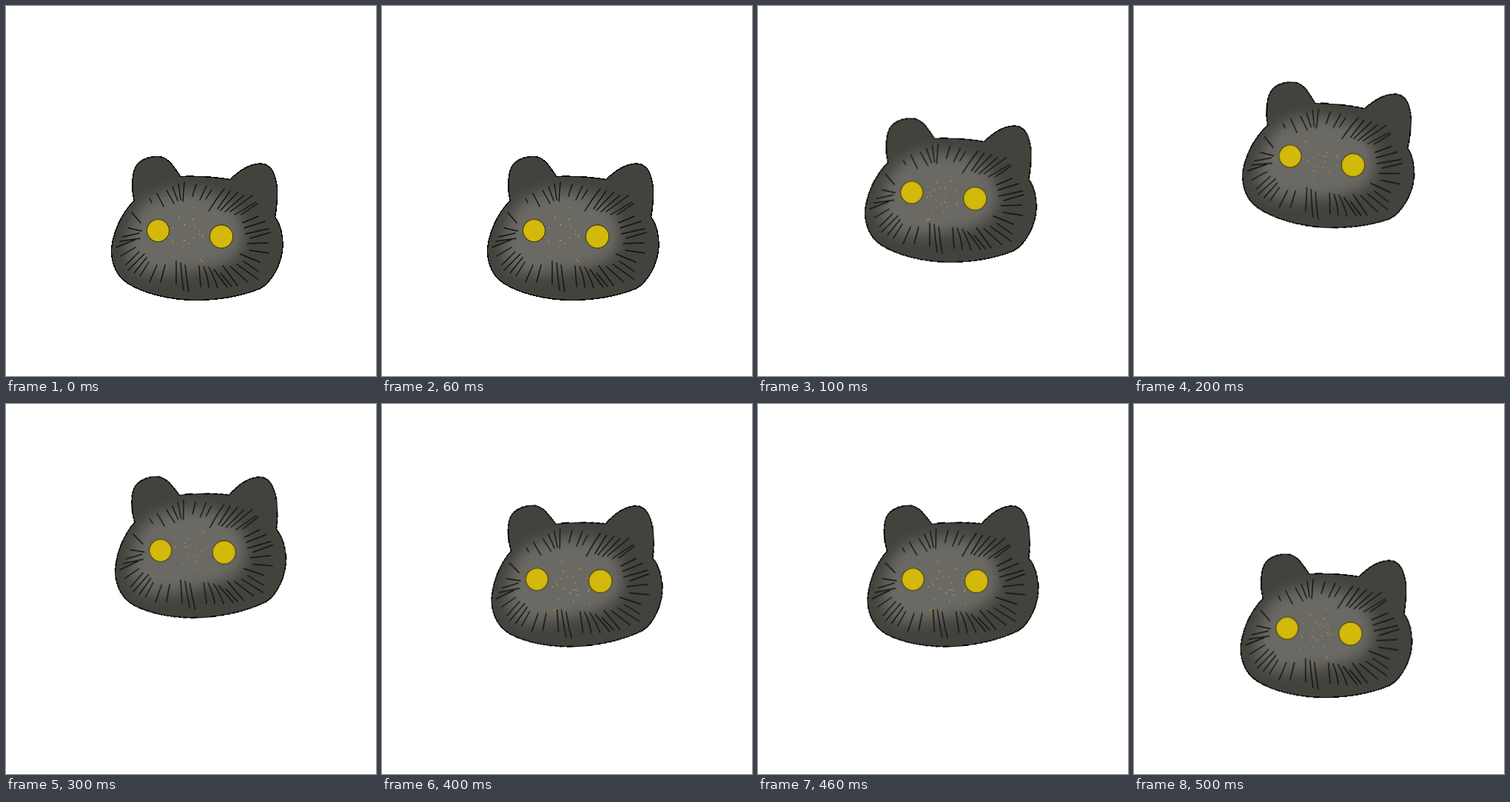
These frames come from a looping animation (500x500 px, 600 ms). An HTML page without scripts:

```html
<!DOCTYPE html>
<html lang="en">
<head>
<meta charset="utf-8">
<title>Bouncing cat head</title>
<style>
  html, body { margin: 0; width: 100%; height: 100%; overflow: hidden; background: #fff; }
  svg { display: block; width: 100%; height: 100%; }
  .head, .specks { animation: bounce .6s step-end infinite; }
  .head { transform-origin: 248.2px 307.5px; }
  .specks { animation-name: shuffle; transform-origin: 246px 308px; }
  .skin { fill: #43423d; }
  .rim { fill: none; stroke: #060605; stroke-width: 1.5; shape-rendering: crispEdges; }
  .fur { fill: none; stroke: #12110e; stroke-width: 1.4; stroke-linecap: round; }
  .eyes { fill: #d2b90b; stroke: #46400f; stroke-width: 1.1; }
  .gold, .pale { fill: none; stroke: #c8a804; stroke-width: 1.6; }
  .pale { stroke: #b3b09c; stroke-width: 1.2; }

  @keyframes bounce {
    0% { transform: none; }
    16.667% { transform: translate(2.3px, -51.4px) rotate(.2deg); }
    33.333% { transform: translate(5.3px, -98.5px) rotate(2.7deg); }
    50% { transform: translate(3.5px, -108.3px) rotate(-3.7deg); }
    66.667% { transform: translate(4px, -69.3px) rotate(-3.7deg); }
    83.333%, 100% { transform: translate(1.5px, -.8px) rotate(-.4deg); }
  }
  @keyframes shuffle {
    0% { transform: none; }
    16.667% { transform: scale(-1, .9); }
    33.333% { transform: rotate(180deg) scale(1.1, .7); }
    50% { transform: scale(1, -.7); }
    66.667% { transform: translate(4px, 5px) scale(-1.2, .9); }
    83.333%, 100% { transform: rotate(9deg) scale(.95, .9); }
  }
</style>
</head>
<body>
<svg viewBox="0 0 500 500">
  <defs>
    <path id="shape" d="M173 263C170 249 169.500 231 174.500 219C180 207 194 203 207 203.500C221 205 228 220 236 230.500
      Q270 229 303 234.500C315 223 328 213 345 213C360 214 365 230 366.500 247Q367 268 363.500 285
      C372 296 374 309 374 325C373 347 360 373 343 382C318 392 287 397.500 255 397.500
      C222 397 187 389 165 375C148 364 142 346 142.500 327C146 303 156 281 173 263Z"/>
    <clipPath id="inside"><use href="#shape"/></clipPath>
    <filter id="soft" x="-30%" y="-30%" width="160%" height="160%" color-interpolation-filters="sRGB">
      <feGaussianBlur stdDeviation="9"/>
    </filter>
  </defs>
  <g class="head">
    <use class="skin" href="#shape"/>
    <g clip-path="url(#inside)">
      <path d="M182 271C202 246 245 243 280 254C309 264 324 287 321 315C318 342 291 353 265 356
        C232 361 186 370 170 352C156 336 164 294 182 271Z" fill="#6a6963" filter="url(#soft)"/>
    </g>
    <use class="rim" href="#shape"/>
    <g class="fur">
      <path d="M194 260L197 266M204 253L213 271M217 249L227 267M225 244L232 263M233 240L236 262
        M241 238L239 264M257 241L252 257M271 243L262 262M278 248L270 261M295 247Q286 258 274 277M303 250L286 274
        M313 252L290 276M321 256L296 278M333 256L303 278M338 265L309 282M340 267L318 282"/>
      <path d="M170 279L182 293M165 300L183 304M158 312L180 307M154 318L181 314M149 326L174 316M155 338L175 326
        M162 350L180 332M165 357L187 335M173 361L190 340M181 365L193 346"/>
      <path d="M194 373L204 350M209 373L215 350M230 376L230 345M240 384Q237 365 236 347M247 386Q244 368 242 350
        M263 379L261 351M274 380Q273 366 267 352M286 381Q281 365 274 353M299 380L281 356M305 379L290 361
        M313 378L293 351M327 373L303 352M340 369L312 349"/>
      <path d="M341 359L321 345M343 346L316 335M355 334L329 330M354 320L326 321M357 306L330 314M355 301L323 308
        M350 291L322 300M341 284L320 293"/>
    </g>
    <g class="specks">
      <path class="gold" d="M233 286h1.600M252 288h1.600M241 296h1.600M260 308h1.600M265 310h1.600M225 320h1.600
        M241 317h1.600M262 343h1.600M265 345h1.600"/>
      <path class="pale" d="M253 273h1.200M255 299h1.200M225 300h1.200M240 307h1.200M253 314h1.200M261 303h1.200
        M238 318h1.200M246 321h1.200M238 325h1.200M243 333h1.200M259 330h1.200M225 338h1.200M248 297h1.200M224 317h1.200"/>
    </g>
    <g class="eyes">
      <circle cx="205.500" cy="303.500" r="15"/>
      <circle cx="291" cy="311.500" r="15.600"/>
    </g>
  </g>
</svg>
</body>
</html>
```
